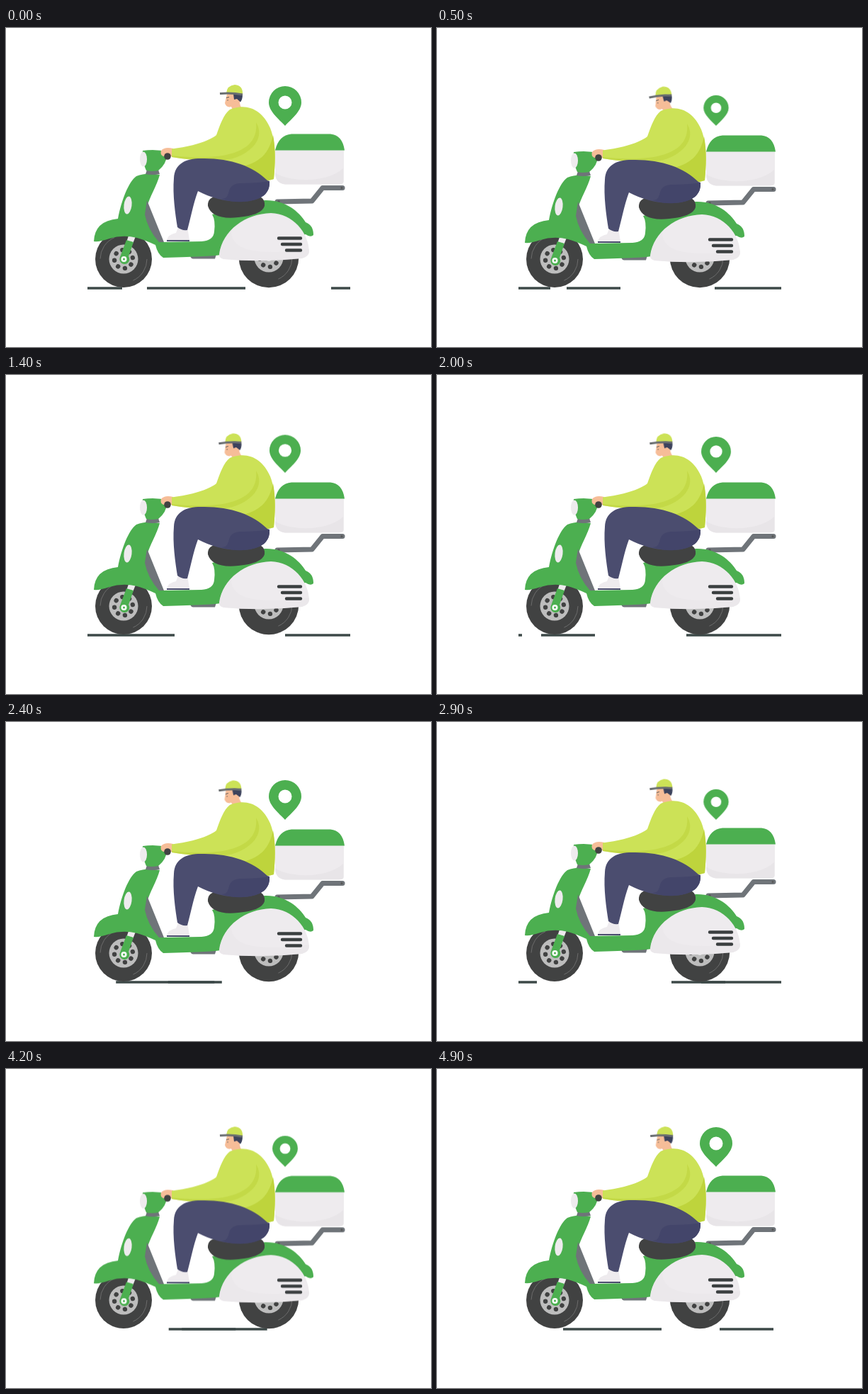
An HTML page without scripts for the animation above (5 s loop, 600 by 450 pixels).

```html
<!DOCTYPE html>
<html lang="en">
<head>
<meta charset="utf-8">
<title>Scooter delivery</title>
<style>
html, body { margin: 0; width: 100%; height: 100%; overflow: hidden; background: #fff; }
svg { display: block; width: 600px; height: 450px; }
.green { fill: #4caf50; }
.dark { fill: #414242; }
.grey { fill: #6f7479; }
.pale { fill: #eeebee; }
.shade { fill: #e5e1e4; }
.skin { fill: #f6bd98; }
.lime { fill: #cce257; }
.fold { fill: #bed43c; }
.navy { fill: #4b4d6f; }
.road, .slots, .rack { fill: none; }
.road { stroke: #3d4948; stroke-width: 3.6; }
.slots { stroke: #3b3f40; stroke-width: 4.4; stroke-linecap: round; }
.rack { stroke: #6f7479; stroke-width: 7; stroke-linejoin: round; stroke-linecap: round; }

.long { stroke-dasharray: 139 232; animation: long 5s infinite; }
.short { stroke-dasharray: 76 295; animation: short 5s infinite; }
.ride { animation: ride 5s linear infinite; }
.head { transform-origin: 326px 112px; animation: nod 5s ease-in-out infinite; }
.pin { transform-origin: 394px 138px; animation: pulse 5s ease-in-out infinite; }

/* each stretch of road advances in 100 ms ticks */
@keyframes long {
  0% { stroke-dashoffset: -84px; animation-timing-function: steps(5); }
  10% { stroke-dashoffset: -277px; animation-timing-function: steps(9); }
  28% { stroke-dashoffset: -726px; animation-timing-function: steps(6); }
  40% { stroke-dashoffset: -979px; animation-timing-function: steps(9); }
  58% { stroke-dashoffset: -1371px; animation-timing-function: steps(7); }
  72% { stroke-dashoffset: -1696px; animation-timing-function: steps(13); }
  98% { stroke-dashoffset: -2289px; animation-timing-function: steps(1); }
  100% { stroke-dashoffset: -2334px; }
}
@keyframes short {
  0% { stroke-dashoffset: -344px; animation-timing-function: steps(5); }
  10% { stroke-dashoffset: -439px; animation-timing-function: steps(9); }
  28% { stroke-dashoffset: -650px; animation-timing-function: steps(6); }
  40% { stroke-dashoffset: -774px; animation-timing-function: steps(9); }
  58% { stroke-dashoffset: -958px; animation-timing-function: steps(7); }
  72% { stroke-dashoffset: -1117px; animation-timing-function: steps(13); }
  98% { stroke-dashoffset: -1397px; animation-timing-function: steps(1); }
  100% { stroke-dashoffset: -1418px; }
}
@keyframes ride {
  0%, 18%, 35%, 57%, 59%, 71%, 73%, 90% { transform: translateY(0); }
  9%, 11%, 27%, 29%, 39%, 48%, 65%, 81% { transform: translateY(2px); }
  98%, 100% { transform: translateY(1px); }
}
@keyframes nod {
  0%, 20%, 85% { transform: rotate(0); }
  10%, 72% { transform: rotate(-8deg); }
  28%, 40%, 58% { transform: rotate(-5deg); }
  98%, 100% { transform: rotate(-2.5deg); }
}
@keyframes pulse {
  0%, 24%, 48%, 72%, 96%, 98%, 100% { transform: scale(1); }
  28% { transform: scale(.957); }
  40% { transform: scale(.91); }
  10%, 34%, 58%, 82% { transform: scale(.77); }
}
</style>
</head>
<body>
<svg viewBox="0 0 600 450">
  <defs>
    <g id="hub">
      <circle r="33" fill="none" stroke="#777" stroke-width=".8" stroke-dasharray="38 66"/>
      <circle r="20.5" fill="#bdbdbd"/>
      <circle r="13" fill="none" stroke="#414242" stroke-width="6.4" stroke-linecap="round" stroke-dasharray=".01 10.2" transform="rotate(-9)"/>
      <circle r="5" fill="#e6e6e6"/>
    </g>
  </defs>

  <path class="road long" d="M115 367H486"/>
  <path class="road short" d="M115 367H486"/>

  <g transform="translate(371 324)"><circle class="dark" r="42.3"/><use href="#hub"/></g>
  <g transform="translate(166 326)"><circle class="dark" r="40"/><use href="#hub"/></g>

  <path class="green pin" fill-rule="evenodd" d="M394 138C386 129 371 118 371 105A23 23 0 0 1 417 105C417 118 402 129 394 138ZM394 95.500A9.500 9.500 0 1 0 394 114.500A9.500 9.500 0 1 0 394 95.500Z"/>

  <g class="ride">
    <!-- cargo box -->
    <path class="rack" d="M383 245L432 244L447 225.500H475"/>
    <circle cx="385" cy="245" r="1.800" fill="#555"/>
    <circle cx="474" cy="225.500" r="1.500" fill="#555"/>
    <path class="pale" d="M380 172H477V217Q476 220.500 470 220.500H394Q381 219 380 206Z"/>
    <path class="shade" d="M380 204C395 216 450 221 476 198V217Q476 220.500 470 220.500H394Q381 219 380 206Z" opacity=".6"/>
    <path class="green" d="M380 172.500Q385 151 403 149.500H458Q475 151 478 172.500Z"/>

    <!-- chassis -->
    <path class="grey" d="M260 319H297L295 325.500H264Q260 325 260 319Z"/>
    <path class="pale" d="M173 293L183 294L179 304L170 302Z"/>
    <path class="green" d="M170 299L180 302L173 322A7 7 0 1 1 161 323Z"/>
    <circle cx="166.500" cy="326" r="4" fill="#fff"/>
    <circle cx="166.500" cy="326" r="1.500" fill="#4caf50"/>
    <path class="green" d="M124 301Q125 272 158 269C163 243 173 217 184 209Q198 203 217 207C213 222 203 238 199 252Q207 288 221 302L276 301Q293 300 294 287Q296 271 291 263L365 243C394 242 414 259 423 274Q434 278 434 292Q430 296 423 291L380 300L302 320Q296 322 222 324Q214 319 211 306Q196 299 185 296Q165 291 146 297Q132 302 124 301Z"/>
    <path class="grey" d="M199 243L223 302H216Q200 284 196 263Z"/>
    <ellipse class="pale" cx="172" cy="250" rx="5.500" ry="12.500" transform="rotate(7 172 250)"/>
    <path class="pale" d="M301 319C306 285 338 262 374 261C405 262 427 288 428 315Q428 322 418 325Q361 331 307 326Q300 324 301 319Z"/>
    <path class="shade" d="M301 319C303 307 309 294 318 285C317 313 350 322 428 312Q429 322 418 325Q361 331 307 326Q300 324 301 319Z" opacity=".35"/>
    <path class="slots" d="M385 296.500H416M390 305H416M396 313.500H416"/>
    <path class="dark" d="M285 251Q284 238 300 237H355Q366 239 365 251Q361 264 328 267Q291 271 285 251Z"/>

    <!-- steering head -->
    <path class="grey" d="M199 200H215L217 206Q207 208 197 206Z"/>
    <path class="green" d="M193 173Q212 170 229 175Q226 193 215 201Q205 203 198 201Q191 186 193 173Z"/>
    <ellipse class="pale" cx="194" cy="185" rx="5" ry="10.500"/>

    <!-- rider -->
    <path class="pale" d="M243 281H256L259 299H227Q229 291 240 289Z"/>
    <path class="navy" d="M227 299H259V301H227Z"/>
    <path class="skin" d="M219 173Q224 167 236 170V181L222 181Q217 178 219 173Z"/>
    <circle class="dark" cx="228" cy="181" r="4.800"/>
    <g class="head">
      <path class="skin" d="M312 93L309 106Q311 113 318 111L322 120L336 116Q329 111 330 101L328 93Z"/>
      <path d="M321 93H334Q334 101 331 104.500L326 100L322 101Z" fill="#3c425c"/>
      <path d="M311 98.500L315 97.500M313 101V102.500" stroke="#555" fill="none"/>
      <path class="lime" d="M311 92Q312 81 323 80Q335 81 334 94Q324 91 311 92Z"/>
      <path d="M302 92.500Q319 91 334 94" fill="none" stroke="#696d70" stroke-width="3"/>
    </g>
    <path class="lime" d="M316 115C341 105 362 116 373 141C382 164 380 189 378 213Q367 217 354 214C332 202 313 190 296 187C275 188 254 185 234 182V170.500C262 167 286 160 297 151C302 137 307 122 316 115Z"/>
    <path class="fold" d="M377 151C381 172 380 193 378 213Q367 217 354 213L328 196C358 192 372 176 377 151Z"/>
    <path class="fold" d="M353 133C361 146 357 159 348 168C336 180 319 187 296 187C277 188 254 185 234 182V180C291 186 326 180 343 164Q355 152 353 133Z" opacity=".6"/>
    <path class="navy" d="M237 212C238 191 254 184 275 184C315 183 348 194 369 215L372 216C373 233 362 243 335 245C312 246 290 240 271 230C264 249 261 267 256 285Q248 286 242 281C239 262 235 235 237 212Z"/>
    <path d="M372 216C373 233 362 243 335 245C324 246 314 244 304 241C321 241 307 221 330 219Q356 219 372 216Z" fill="#43456a"/>
  </g>
</svg>
</body>
</html>
```
